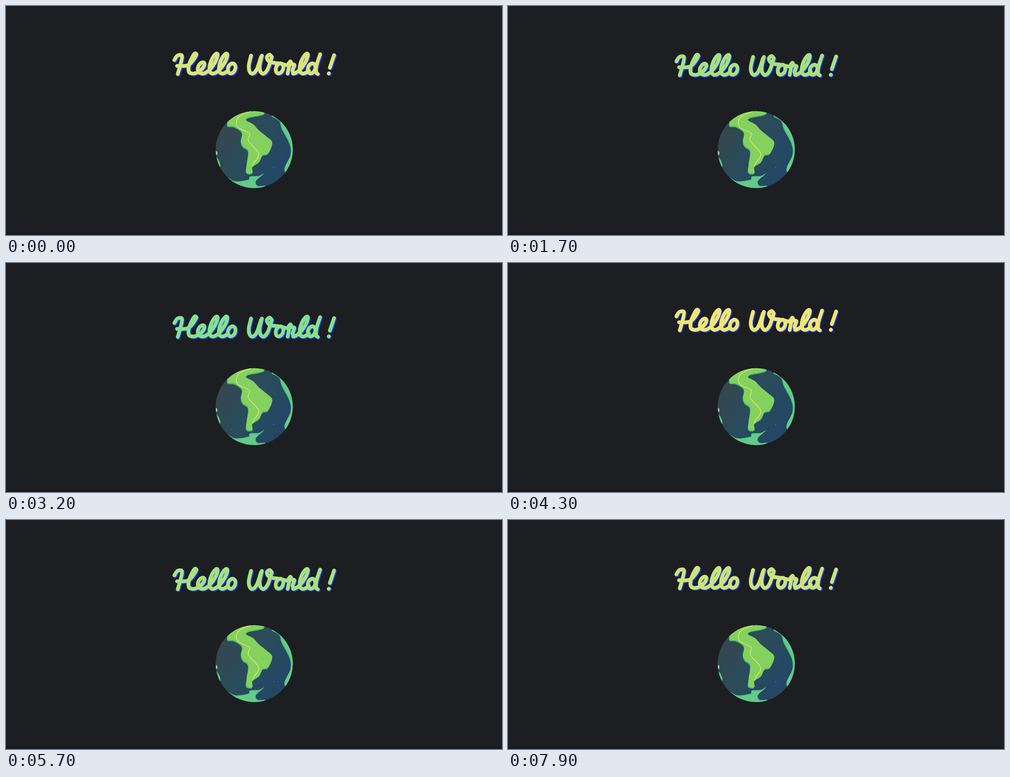
Write an HTML page with a canvas that moves like this. It is 1099 by 509 pixels and loops after 8000 ms.

```html
<!DOCTYPE html>
<html lang="en">
<head>
<meta charset="utf-8">
<title>Hello World !</title>
<style>
  html, body { margin: 0; width: 100%; height: 100%; overflow: hidden; background: #1d1e22; }
  canvas { display: block; }
</style>
</head>
<body>
<canvas id="stage" width="1099" height="509" role="img" aria-label="Hello World !"></canvas>
<script>
const ctx = document.getElementById('stage').getContext('2d');
const TAU = Math.PI * 2;

const LOOP = 8000, STEP = 100;
const CYCLE = 2000, START = 700;
const DROP = 26, BASELINE = 148;

// --- paths ---

// Smooth curve through x, y pairs (Catmull-Rom).
function curve(points, dx = 0) {
  const path = new Path2D();
  const n = points.length / 2;
  const at = i => {
    const k = Math.max(0, Math.min(n - 1, i)) * 2;
    return [points[k] + dx, points[k + 1]];
  };
  path.moveTo(...at(0));
  for (let i = 0; i < n - 1; i++) {
    const a = at(i - 1), b = at(i), c = at(i + 1), d = at(i + 2);
    path.bezierCurveTo(
      b[0] + (c[0] - a[0]) / 6, b[1] + (c[1] - a[1]) / 6,
      c[0] - (d[0] - b[0]) / 6, c[1] - (d[1] - b[1]) / 6,
      c[0], c[1]);
  }
  return path;
}

// Handwritten loop as a slanted trochoid; `tail` carries it on to the next letter.
function penLoop(x, pitch, radius, height, tail = 0) {
  const path = new Path2D();
  const end = TAU + tail;
  for (let i = 0; i <= 60; i++) {
    const t = end * i / 60;
    const rise = height * (1 - Math.cos(t)) / 2;
    path.lineTo(x + pitch * t / TAU + radius * Math.sin(t) + 0.45 * rise, BASELINE - rise);
  }
  return path;
}

function bowl(x) {
  const path = new Path2D();
  path.ellipse(x, 136.5, 8, 11.5, 0.35, 0, TAU);
  return path;
}

// --- easing and colour ---

function bezierEase(x1, y1, x2, y2) {
  const f = (a, b, u) => 3 * a * u * (1 - u) ** 2 + 3 * b * u * u * (1 - u) + u ** 3;
  return x => {
    let lo = 0, hi = 1;
    for (let i = 0; i < 24; i++) {
      const mid = (lo + hi) / 2;
      if (f(x1, x2, mid) < x) lo = mid; else hi = mid;
    }
    return f(y1, y2, (lo + hi) / 2);
  };
}
const ease = bezierEase(0.25, 0.1, 0.25, 1);

const CYAN = [143, 255, 241], GREEN = [133, 221, 134], YELLOW = [247, 231, 116];
const GREEN_AT = 0.375;

function tintAt(phase) {
  const early = phase < GREEN_AT;
  const [from, to] = early ? [CYAN, GREEN] : [GREEN, YELLOW];
  const k = ease(early ? phase / GREEN_AT : (phase - GREEN_AT) / (1 - GREEN_AT));
  return `rgb(${from.map((v, i) => Math.round(v + (to[i] - v) * k))})`;
}

// --- title ---

const cup = [5,108, 0,130, 2,144, 9,148, 18,138, 27,111];
const title = new Path2D();
[
  // H
  curve([373,118, 380,108, 390,109, 386,130, 380.5,149]),
  curve([379,131, 404,129, 421,108, 417,104.5, 406,127, 405,144, 413,148]),
  // ello
  penLoop(414, 22, 11, 25),
  penLoop(436, 22, 10, 44.5),
  penLoop(458, 21, 10, 44.5, 0.8),
  bowl(500),
  // W
  curve(cup, 538),
  curve(cup, 562),
  curve([589,111, 584,106, 578,112, 584,122, 602,125]),
  // orld
  bowl(606),
  curve([612,127, 623,129, 630,121, 633,127, 639,129, 635,141, 638,148]),
  curve([629,124, 624,148]),
  penLoop(636, 22, 10, 44.5, 0.8),
  bowl(677),
  curve([696,105, 688,130, 687,145, 691,149]),
  // !
  curve([727,107, 717.5,135]),
  curve([715,148, 715.6,147.5])
].forEach(stroke => title.addPath(stroke));

function drawTitle(time) {
  const phase = ((time - START + CYCLE) % CYCLE) / CYCLE;
  ctx.save();
  ctx.lineCap = ctx.lineJoin = 'round';
  ctx.lineWidth = 8.3;
  ctx.translate(2, DROP * (1 - ease(phase)) + 2);
  ctx.strokeStyle = '#1a3ae0';
  ctx.stroke(title);
  ctx.translate(-2, -2);
  ctx.strokeStyle = tintAt(phase);
  ctx.stroke(title);
  ctx.restore();
}

// --- globe ---

const america = curve([
  491,257, 492,266, 507,268, 523,280, 521,299, 525,311, 537,322, 534,350, 533,369,
  546,371, 546,357, 561,346, 569,331, 581,327, 590,304, 577,290, 560,276, 548,263,
  532,254, 538,247, 563,242, 573,236, 560,215, 480,240
]);
const africa = curve([
  589,244, 606,254, 612,272, 629,305, 631,330, 618,365, 650,380, 650,240, 600,232
]);
const antarctica = curve([
  490,382, 508,391, 537,387, 540,380, 559,379, 571,373, 553,390, 557,401, 574,402,
  560,420, 490,410
]);
const ridge = curve([
  543,234, 515,247, 513,269, 539,283, 537,300, 560,328, 549,349, 546,356
]);

function land(path, fill, edge, dx, dy) {
  ctx.save();
  ctx.translate(dx, dy);
  ctx.fillStyle = edge;
  ctx.fill(path);
  ctx.restore();
  ctx.fillStyle = fill;
  ctx.fill(path);
}

function islet(x, y, rx, ry, color, tilt = 0) {
  ctx.fillStyle = color;
  ctx.beginPath();
  ctx.ellipse(x, y, rx, ry, tilt, 0, TAU);
  ctx.fill();
}

const sea = ctx.createLinearGradient(477, 268, 622, 370);
sea.addColorStop(0, '#36474e');
sea.addColorStop(0.45, '#2a4c5b');
sea.addColorStop(1, '#224668');

function drawGlobe() {
  ctx.save();
  ctx.beginPath();
  ctx.arc(550, 319.2, 85.4, 0, TAU);
  ctx.fillStyle = sea;
  ctx.fill();
  ctx.clip();
  land(africa, '#63ca89', '#3fb878', -1, 2);
  land(antarctica, '#63ca89', '#3fb878', 1, -1.5);
  land(america, '#84d160', '#42be72', -1, 2.4);
  islet(465, 327, 3.5, 4.5, '#8fd6a0');
  islet(470, 347, 3, 11, '#63ca89', -0.4);
  islet(624, 354, 1.2, 1.2, '#8fdd70');
  islet(593, 359, 0.7, 0.7, '#8fd6a0');
  ctx.strokeStyle = '#f2e25c';
  ctx.lineWidth = 1.5;
  ctx.lineCap = 'round';
  ctx.stroke(ridge);
  ctx.restore();
}

// --- playback ---

function draw(now) {
  const time = Math.floor((now % LOOP) / STEP) * STEP;
  ctx.fillStyle = '#1d1e22';
  ctx.fillRect(0, 0, 1099, 509);
  ctx.fillStyle = '#18191d';
  ctx.fillRect(0, 505, 1099, 4);
  drawGlobe();
  drawTitle(time);
}

const begin = performance.now();
function tick() {
  draw(performance.now() - begin);
  requestAnimationFrame(tick);
}
tick();
</script>
</body>
</html>
```
